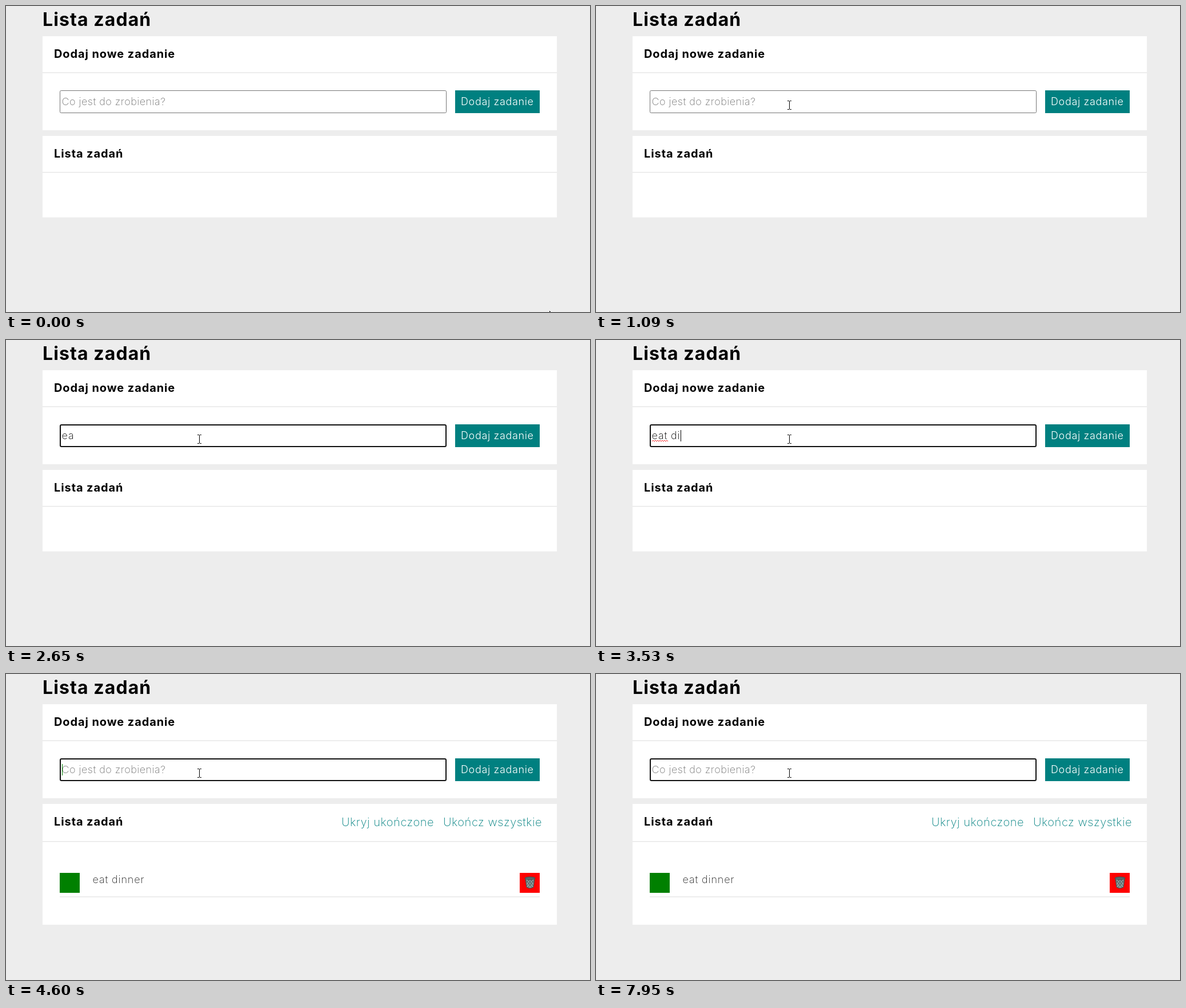
Animation of 1022 by 537 pixels, one loop 8 s. Source, as an HTML page:

```html
<!DOCTYPE html>
<html lang="pl">
<head>
<meta charset="utf-8">
<title>Lista zadań</title>
<style>
  html, body { margin: 0; height: 100%; overflow: hidden; background: #ededed; }
  svg { display: block; width: 1022px; height: 537px; }
  text { font-family: Inter, "Open Sans", sans-serif; font-optical-sizing: none; white-space: pre; }
  .title { font-size: 32px; font-weight: 700; letter-spacing: 1.1px; }
  .heading { font-size: 20px; font-weight: 700; letter-spacing: .9px; }
  .body { font-size: 18px; font-weight: 250; letter-spacing: .85px; }
  .hint { letter-spacing: .45px; fill: #757575; }
  .button { font-size: 18px; font-weight: 300; letter-spacing: .65px; fill: #fff; }
  .link { font-size: 20px; font-weight: 250; letter-spacing: .55px; fill: #008080; }
  .panel { fill: #fff; }
  .line { fill: #ededed; }
</style>
</head>
<body>
<svg viewBox="0 0 1022 537">
  <text class="title" x="64" y="35">Lista zadań</text>

  <rect class="panel" x="64" y="53" width="900" height="165"/>
  <rect class="line" x="64" y="116" width="900" height="2"/>
  <text class="heading" x="84" y="91">Dodaj nowe zadanie</text>
  <rect id="field" fill="#fff" rx="2"/>
  <text id="hint" class="body hint" x="97.5" y="174">Co jest do zrobienia?</text>
  <text id="typed" class="body" x="97.5" y="174"></text>
  <path id="squiggle" fill="none" stroke="#e22" d="M98 178l2-2 2 2 2-2 2 2 2-2 2 2 2-2 2 2 2-2 2 2 2-2 2 2 2-2 2 2"/>
  <rect id="caret" y="158" width="1" height="20"/>
  <rect x="786" y="148" width="148" height="40" fill="#008080"/>
  <text class="button" x="796" y="174">Dodaj zadanie</text>

  <rect id="listPanel" class="panel" x="64" y="228" width="900"/>
  <rect id="listLine" class="line" x="64" width="900" height="2"/>
  <text class="heading" x="84" y="266">Lista zadań</text>

  <g id="task">
    <text class="link" x="587" y="267">Ukryj ukończone</text>
    <text class="link" x="765" y="267">Ukończ wszystkie</text>
    <rect x="94" y="349" width="35" height="35" fill="#008000"/>
    <text class="body" x="151.5" y="367" fill="#222">eat dinner</text>
    <rect x="899" y="349" width="35" height="35" fill="#f00"/>
    <g stroke="#3c4a4a">
      <path fill="#8f9c9c" d="M909 359l2 15q6 4 12 0l2-15z"/>
      <path fill="none" stroke-width=".8" d="M910 362l11 13M914 361l9 11M919 361l5 6M924 362l-11 13M920 361l-9 11M915 361l-5 6"/>
      <ellipse cx="917" cy="358.5" rx="9" ry="2.5" fill="#59686a"/>
    </g>
    <rect class="line" x="94" y="390" width="840" height="2"/>
  </g>

  <path id="arrow" fill="#fff" stroke="#000" d="M.5 .5V16.5L4.3 13 6.7 18.5 9.2 17.5 6.8 12H11.5z"/>
  <path id="beam" fill="none" stroke="#000" d="M-3 -7.5H0M1 -7.5H4M-3 7.5H0M1 7.5H4M.5 -7V7"/>
</svg>
<script>
const LOOP = 8000, STEP = 67.5;
const FOCUS = 1300, SPELLCHECK = 3120, SUBMIT = 4600;
const PHRASE = "eat dinner";
const KEY_TIMES = [1850, 2120, 2780, 2980, 3330, 3530, 3730, 3860, 4000, 4200];
const CARET_OFF = [[2650, 2780], [4730, 5280], [5810, 6340], [6890, 7420], [7950, LOOP]];

const el = id => document.getElementById(id);
const show = (id, on) => el(id).setAttribute("display", on ? "inline" : "none");
const set = (id, attrs) => {
  for (const name in attrs) el(id).setAttribute(name, attrs[name]);
};
const mix = (a, b, k) => a + (b - a) * Math.min(1, Math.max(0, k));

// The pointer sweeps in from the bottom right, then drifts up to the field.
function pointerAt(t) {
  if (t < 607) {
    const left = 1 - t / 607.5;
    return [377 + 574 * left ** 1.5, 235 + 300 * left ** 2.5];
  }
  if (t < 810) {
    const k = (t - 607.5) / 202.5;
    return [mix(377, 356, k), mix(235, 204, k)];
  }
  const k = (t - 810) / 270;
  return [mix(356, 338, k), mix(204, 174, k)];
}

function render(t) {
  const [x, y] = pointerAt(Math.floor(t / STEP) * STEP).map(Math.round);
  const overField = y < 188;
  show("arrow", !overField);
  show("beam", overField);
  set(overField ? "beam" : "arrow", { transform: `translate(${x} ${y})` });

  const focused = t >= FOCUS, submitted = t >= SUBMIT;
  const edge = focused ? 2 : 1;
  set("field", {
    x: 94 + edge / 2, y: 148 + edge / 2, width: 677 - edge, height: 40 - edge,
    stroke: focused ? "#101010" : "#767676", "stroke-width": edge
  });

  const count = submitted ? 0 : KEY_TIMES.filter(key => t >= key).length;
  el("typed").textContent = PHRASE.slice(0, count);
  show("hint", !count);
  show("squiggle", t >= SPELLCHECK && !submitted);
  show("caret", focused && !CARET_OFF.some(([from, to]) => t >= from && t < to));
  const typedWidth = count ? el("typed").getComputedTextLength() : 0;
  set("caret", { x: Math.round(98 + typedWidth), fill: submitted ? "#008000" : "#000" });

  show("task", submitted);
  set("listPanel", { height: submitted ? 212 : 143 });
  set("listLine", { y: submitted ? 293 : 291 });
}

const start = performance.now();
function tick() {
  render((performance.now() - start) % LOOP);
  requestAnimationFrame(tick);
}
tick();
</script>
</body>
</html>
```
